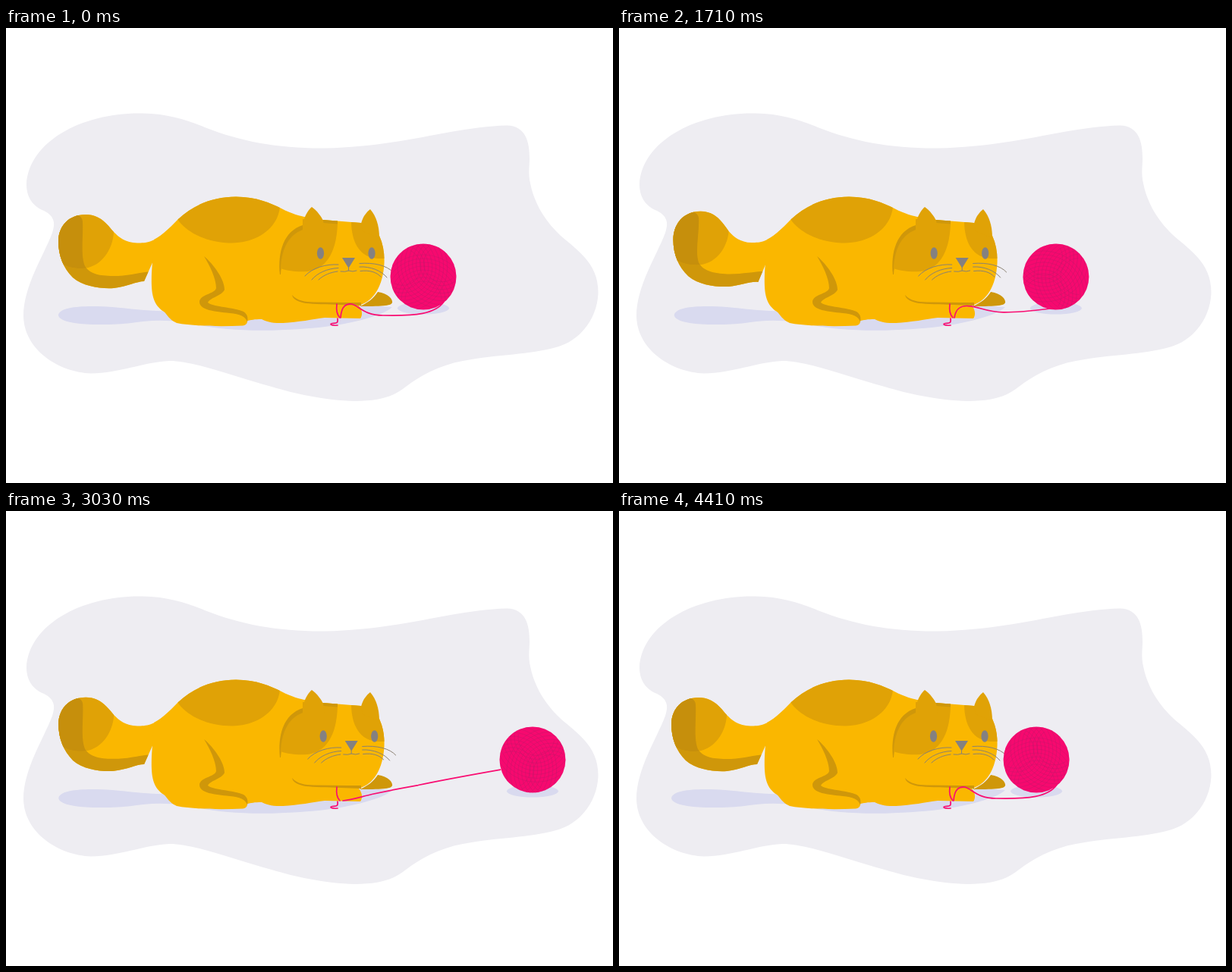
Recreate the animation shown at these times as an HTML page. Size 800x600 px, loop 4440 ms.

```html
<!DOCTYPE html>
<html lang="en">
<head>
<meta charset="utf-8">
<title>Cat and yarn</title>
<style>
  html, body { margin: 0; width: 100%; height: 100%; overflow: hidden; background: #fff; }
  svg { display: block; width: 100%; height: 100%; }
  .light { fill: #fab700; }
  .patch { fill: #e0a206; }
  .shade { fill: #cf970a; }
  .cast { fill: #d9daef; }
  .face { fill: #848181; }
  .line { fill: none; stroke: #8b8272; stroke-width: 1; stroke-linecap: round; }
  .yarn { fill: none; stroke: #f90d72; stroke-width: 1.7; stroke-linecap: round; }
</style>
</head>
<body>
<svg viewBox="0 0 800 600">
  <defs>
    <clipPath id="tailClip"><path id="tailEdge"/></clipPath>
    <clipPath id="bodyClip"><use href="#body"/></clipPath>
    <clipPath id="ballClip"><circle r="43.5"/></clipPath>
  </defs>

  <path fill="#eeedf2" d="M27 206C30 150 100 111 180 112.500C215 113 240 122 262 131C310 150 360 159 420 158.500C520 157 590 130 660 128.500C685 129 690 150 690 172C690 182 688 192 691 205C697 235 715 261 737 279C760 298 781 315 780.500 350C779 385 755 413 725 421C690 431 650 430 602 439C570 445 545 459 527 473C512 485 495 492 460 492C420 491 380 482 350 473C300 460 250 439 215 439C180 441 150 455 112 455.500C70 454 24 425 23 380C23 340 50 300 61 270C66 255 62 247 50 241C38 236 27 226 27 206Z"/>

  <path id="tailCast" class="cast" d="M69 379C70 366 110 366 140 368C165 370 190 374 215 373L235 388C205 384 185 386 165 389C140 392 72 394 69 379Z"/>
  <path id="bodyCast" class="cast"/>
  <ellipse id="ballCast" class="cast" cy="369.500" rx="34" ry="8"/>

  <path id="tail" class="light"/>
  <g clip-path="url(#tailClip)">
    <path id="tailShade" class="shade"/>
    <path id="tailTip" class="patch"/>
    <g id="tipShadeClip"><path id="tipShade" fill="#c68f0c"/></g>
  </g>

  <path id="paw" class="shade"/>
  <g id="torso">
    <path id="body" class="light" d="M195 279C208 272 217 262 227 252C248 232 275 222.500 303 222.500C330 222.500 349 231 363 238C376 245 388 248 398 250L418 253L468 257L492 274C497 285 499 297 498.500 310C497 340 485 360 465 366C470 372 470 379 467 383L420 382C405 384 385 388 365 389C350 389.500 343 387 337 384C327 384 323 385 318 386C318 390 316 392 312 392.500C280 394 245 393 225 389C215 385 212 377 208 374C193 364 191 350 192 322Z"/>
    <g clip-path="url(#bodyClip)">
      <path class="patch" d="M226 252C240 273 270 283.500 298 283.500C330 283 358 265 361 236V215H226Z"/>
      <path class="shade" d="M361 325C358 295 366 268 391 260L396 262V272C372 276 364 300 362 325Z"/>
      <path class="patch" d="M437 254C437 290 425 318 397 321C382 322 370 320 362 317C363 295 370 274 391 266V252Z"/>
      <path class="shade" d="M414 250L437 253V258.500L418 257Z"/>
      <path class="patch" d="M455 254C455 285 468 303 490 304H502V254Z"/>
    </g>
    <path class="patch" d="M391 268C390 252 398 240 403 236C410 241 415 248 418 254L420 268Z"/>
    <path class="patch" d="M468 258C470 249 475 243 480 239C488 248 492 261 492 277L470 268Z"/>
    <path class="shade" d="M261 301C275 313 288 332 288 345C285 353 268 356 266 362C272 368 300 368 313 374C319 378 319 383 318 388C316 380 308 377 295 376C275 374 255 372 255 361C256 351 275 351 277 343C277 330 268 312 261 301Z"/>
    <path class="shade" d="M377 352C384 360 394 361 405 361.500L450 362H468V366L440 365C425 364.500 405 364 395 363C385 361 378 358 377 352Z"/>
  </g>

  <g id="face">
    <ellipse class="face" cx="414.500" cy="297" rx="4.600" ry="7.700"/>
    <ellipse class="face" cx="482" cy="297" rx="4.600" ry="7.700"/>
    <path class="face" d="M443 303H460L452.500 315Q451.500 317 450.500 315Z"/>
    <path class="line" d="M451.500 315V320M441 321Q447 322 451.500 320Q457 322 462 320"/>
    <path class="line" d="M438 312C422 311 404 316 394 327M438 316.500C424 317 410 323 403 332M437 321C428 322 418 326 412 332M466 310.500C485 309 502 313 510 322M466 315C480 314 495 320 502 329M467 320.500C480 319 488 322 494 328"/>
  </g>

  <path class="yarn" d="M436 364C435 372 436 378 440 382M437 383C438 390 435 389 430 389.500C426 390 428 393 437 392"/>
  <path id="thread" class="yarn"/>
  <g id="ball">
    <circle r="43.500" fill="#f6096f"/>
    <g id="strands" clip-path="url(#ballClip)" fill="none" stroke="#b51c68" stroke-width=".6" stroke-opacity=".55"/>
  </g>
</svg>
<script>
const LOOP = 4440, ROLL = 2220, SWISH = 1480, STEP = 30;
const $ = id => document.getElementById(id);
const clamp = v => Math.max(0, Math.min(1, v));
const span = (t, a, b) => clamp((t - a) / (b - a));

// CSS-style cubic-bezier(x1, 0, x2, 1), solved by bisection.
const ease = (x1, x2) => u => {
  let lo = 0, hi = 1, s = u;
  for (let i = 0; i < 24; i++) {
    s = (lo + hi) / 2;
    const x = 3 * s * (1 - s) * ((1 - s) * x1 + s * x2) + s ** 3;
    if (x < u) lo = s; else hi = s;
  }
  return s * s * (3 - 2 * s);
};
const swishEase = ease(.6, .4), returnEase = ease(.36, .39), softEase = ease(.33, .67);

// Blend two paths that share the same commands.
const mix = (a, b, k) => {
  const to = b.match(/[\d.]+/g);
  let i = 0;
  return a.replace(/[\d.]+/g, n => (+n + (to[i++] - n) * k).toFixed(2));
};

const TAIL = [
  'M212 267C195 283 185 283.5 173 283.5C157 283 149 276 142 269C134 260 125 246 105 246C82 246 69 262 69 281C69 301 76 317 88 329C102 341 125 344 142 343C160 341 172 334 182 334C188 335 191 338 192 341L212 330Z',
  'M212 267C200 278 195 280 186 280C174 280 166 271 161 261C153 244 152 216 122 216C100 216 87 240 87 267C87 291 96 304 112 316C130 329 152 328 162 328C175 328 187 330 192 341L212 330Z'];
const SHADE = [
  'M80 240C96 246 101 249 101 256C102 275 98 300 104 314C112 327 130 327 148 327C165 326 178 322 192 321L192 350L60 350L60 240Z',
  'M100 210C120 215 131 218 131 228C129 250 113 262 111 279C110 291 120 304 135 309C155 315 175 318 192 320L192 350L70 350L70 210Z'];
const TIP = [
  'M142 269C141 293 124 318 98 317C88 317 80 315 70 309L60 235L140 235Z',
  'M161 261C154 276 140 284 122 284C108 284 96 282 85 275L75 205L165 205Z'];
const PAW = [
  'M490 348C504 350 510 358 509 362C508 366 500 367 466 367C476 363 484 357 490 348Z',
  'M488 342C515 341 524 347 524 352C524 357 510 358 474 363C480 361 486 352 488 342Z'];
const CAST = [
  'M240 388C280 400 340 401 400 396C450 392 497 380 509 368L480 366L300 370Z',
  'M240 388C280 400 340 401 400 396C455 392 515 377 526 361L490 360L300 370Z'];
const THREAD = [
  [550, 'M441 382C442 366 449 363 456 364C466 367 472 379 497 379C540 380 566 377 577 361'],
  [575, 'M442 382C444 368 452 366 460 366.5C474 367 483 374.5 506 375C530 375 553 372 570 370'],
  [637, 'M444 382C452 377 462 373 473 371.5C490 369 510 369 530 367.5C555 366 580 361 604 355'],
  [680, 'M444 382C455 380 466 376 480 373C500 369 520 366 540 363C570 357.500 600 352 640 344.5']];

const threadAt = x => {
  const i = x < 575 ? 0 : x < 637 ? 1 : 2;
  const [a, b] = [THREAD[i], THREAD[i + 1]];
  return mix(a[1], b[1], (x - a[0]) / (b[0] - a[0]));
};

// Three bundles of wound yarn.
[0, 115, 235].forEach(turn => {
  let d = '';
  for (let r = 24; r < 62; r += 5) d += `M${-r} 30A${r} ${r} 0 0 1 ${r} 30`;
  const p = document.createElementNS('http://www.w3.org/2000/svg', 'path');
  p.setAttribute('d', d);
  p.setAttribute('transform', `rotate(${turn})`);
  $('strands').append(p);
});

const set = (id, name, value) => $(id).setAttribute(name, value);
set('tipShadeClip', 'clip-path', 'url(#tipClip)');
document.querySelector('defs').insertAdjacentHTML('beforeend', '<clipPath id="tipClip"><path id="tipEdge"/></clipPath>');

function draw(t) {
  // Tail: three swings per loop.
  const w = t % SWISH / (SWISH / 2);
  const k = swishEase(w < 1 ? w : 2 - w);
  const tail = mix(...TAIL, k), shade = mix(...SHADE, k), tip = mix(...TIP, k);
  set('tail', 'd', tail);
  set('tailEdge', 'd', tail);
  set('tailShade', 'd', shade);
  set('tipShade', 'd', shade);
  set('tailTip', 'd', tip);
  set('tipEdge', 'd', tip);
  set('tailCast', 'transform', `translate(215 0) scale(${1 - .185 * k} 1) translate(-215 0)`);

  // Ball: knocked away, then reeled back, twice per loop.
  const r = t % ROLL;
  const x = r < 890
    ? 550 + 146 * (1 - (1 - span(r, 210, 890)) ** 2)
    : 696 - 146 * returnEase(span(r, 890, ROLL));
  set('ball', 'transform', `translate(${x} 328)`);
  set('strands', 'transform', `rotate(${(x - 550) / 43.5 * 180 / Math.PI})`);
  set('ballCast', 'cx', x);
  set('thread', 'd', threadAt(x));
  set('face', 'transform', `translate(${(x - 550) / 39} 0)`);

  const reach = 1.9 * (r < 270 ? softEase(span(r, 30, 270)) : 1 - softEase(span(r, 270, 620)));
  set('paw', 'd', mix(...PAW, reach));
  set('bodyCast', 'd', mix(...CAST, reach));

  // One breath per loop.
  const breath = Math.sin(Math.PI * span(t, 740, 1480)) ** 2;
  set('torso', 'transform', `translate(0 392) scale(1 ${1 + .018 * breath}) translate(0 -392)`);
}

const start = performance.now();
function tick() {
  const t = (performance.now() - start) % LOOP;
  draw(t - t % STEP);
  requestAnimationFrame(tick);
}
tick();
</script>
</body>
</html>
```
